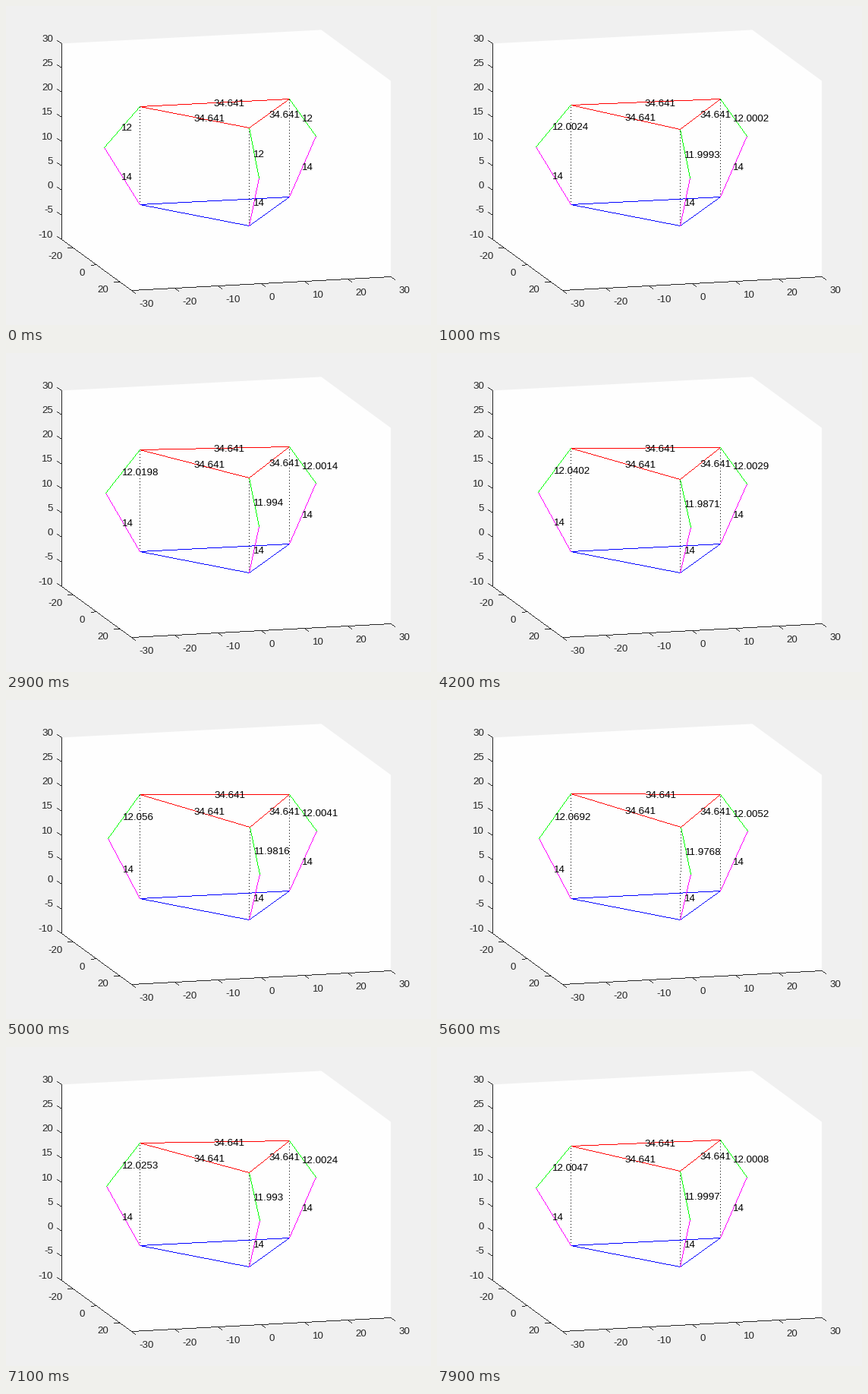
A matplotlib script that plays this animation: 560x420 px, repeating every 8000 ms.

```python
import numpy as np
import matplotlib.pyplot as plt
from matplotlib.animation import FuncAnimation
from matplotlib.colors import to_rgba

W, H, DPI = 560, 420, 100
FRAMES, INTERVAL = 80, 100
DARK = "#262626"
FONT = dict(family="Liberation Sans", fontsize=13.33 * 72 / DPI, va="baseline")
BASELINE = 4.0

# Orthographic projection: screen offset per unit of x, y and z
ORIGIN = np.array([289.8, 267.0])
AXES = np.array([[1.527, 1.12], [5.70, -0.30], [0.0, -6.45]])

# Three-legged platform
RADIUS, HEIGHT, LOWER, UPPER = 20, 20, 14, 12
LEGS = np.radians([0, 120, 240])
RADIAL = np.column_stack([np.cos(LEGS), np.sin(LEGS), np.zeros(3)])
BASE = RADIUS * RADIAL
UP = np.array([0, 0, 1])
PAIRS = [(0, 1), (1, 2), (2, 0)]

PEAK_FRAME, PEAK_TILT = 59, 0.0575


def project(p):
    return ORIGIN + np.asarray(p, float) @ AXES


def tilt(frame):
    """Roll and pitch: both rise together, then fall at separate rates."""
    if frame <= PEAK_FRAME:
        roll = pitch = frame / PEAK_FRAME
    else:
        step = frame - PEAK_FRAME - 1
        roll, pitch = 1 - 0.0427 * step, 1 - 0.0344 * step
    return roll * PEAK_TILT, pitch * PEAK_TILT


def platform(frame):
    roll, pitch = tilt(frame)
    ca, sa, cb, sb = np.cos(roll), -np.sin(roll), np.cos(pitch), np.sin(pitch)
    turn = np.array([[cb, sb * sa, sb * ca], [0, ca, -sa], [-sb, cb * sa, cb * ca]])
    center = np.array([20.55 * roll * pitch, 10.6 * roll ** 2, HEIGHT])
    return BASE @ turn.T + center


def knees(top):
    """Knees bend outward in each leg's own vertical plane."""
    span = np.linalg.norm(top - BASE, axis=1)[:, None]
    rise = (LOWER ** 2 + span ** 2 - UPPER ** 2) / (2 * span)
    return BASE + RADIAL * np.sqrt(LOWER ** 2 - rise ** 2) + UP * rise


def number(value):
    return f"{value:.4f}".rstrip("0").rstrip(".")


def stroke(canvas, color, start, end, every=1):
    """Hard one-pixel line; a larger step leaves dots."""
    start, end = np.rint(start), np.rint(end)
    count = int(np.abs(end - start).max())
    t = np.arange(0, count + 1, every)[:, None] / max(count, 1)
    x, y = np.rint(start + t * (end - start)).astype(int).T
    canvas[y, x] = to_rgba(color)


fig = plt.figure(figsize=(W / DPI, H / DPI), dpi=DPI, facecolor="#f0f0f0")
ax = fig.add_axes([0, 0, 1, 1])
ax.axis("off")
box_lines = np.zeros((H, W, 4))


def tick(point, direction):
    stroke(box_lines, DARK, point, point + direction / np.hypot(*direction) * 7)


def tick_label(x, y, value, ha="center"):
    ax.text(x, y + BASELINE, str(value), color=DARK, ha=ha, **FONT)


def draw_box():
    hull = project([(-30, -30, 30), (-30, 30, 30), (30, 30, 30),
                    (30, 30, -10), (30, -30, -10), (-30, -30, -10)])
    ax.fill(hull[:, 0], hull[:, 1], color="#fefefe", lw=0, zorder=0)
    corners = hull[[0, 5, 4, 3]]
    for start, end in zip(corners, corners[1:]):
        stroke(box_lines, DARK, start, end)
    for z in range(-10, 31, 5):
        point = project((-30, -30, z))
        tick(point, -AXES[0])
        tick_label(61.7, point[1] - 6.8, z, "right")
    for x in (-20, 0, 20):
        point = project((x, -30, -10))
        tick(point, -AXES[1])
        tick_label(point[0] - (24 if x < 0 else 19 if x == 0 else 22.5), point[1] + 10, x)
    for y in range(-30, 31, 10):
        point = project((30, y, -10))
        tick(point, AXES[0])
        tick_label(point[0] + (20 if y < 0 else 14.5 if y == 0 else 18), point[1] + 17.3, y)


draw_box()
picture = ax.imshow(box_lines, interpolation="nearest", aspect="auto", zorder=2)
labels = [ax.text(0, 0, "", color="black", ha="left", zorder=5, **FONT) for _ in range(9)]
ax.set_xlim(-0.5, W - 0.5)
ax.set_ylim(H - 0.5, -0.5)


def draw_edge(canvas, color, start, end, label=None, every=1):
    a, b = project([start, end])
    stroke(canvas, color, a, b, every)
    if label:
        x, y = (a + b) / 2
        label.set_position((x - 1.2, y + 1 + BASELINE))
        label.set_text(number(np.linalg.norm(end - start)))


def update(frame):
    top = platform(frame)
    knee = knees(top)
    canvas = box_lines.copy()
    for k, (i, j) in enumerate(PAIRS):
        draw_edge(canvas, "black", BASE[k], top[k], every=4)
        draw_edge(canvas, "#0000ff", BASE[i], BASE[j])
    for k, (i, j) in enumerate(PAIRS):
        draw_edge(canvas, "#ff0000", top[i], top[j], labels[k])
        draw_edge(canvas, "#ff00ff", BASE[k], knee[k], labels[3 + k])
        draw_edge(canvas, "#00ff00", knee[k], top[k], labels[6 + k])
    picture.set_data(canvas)
    return [picture, *labels]


anim = FuncAnimation(fig, update, frames=FRAMES, interval=INTERVAL,
                     repeat=True, repeat_delay=0, blit=False)
plt.show()
```
